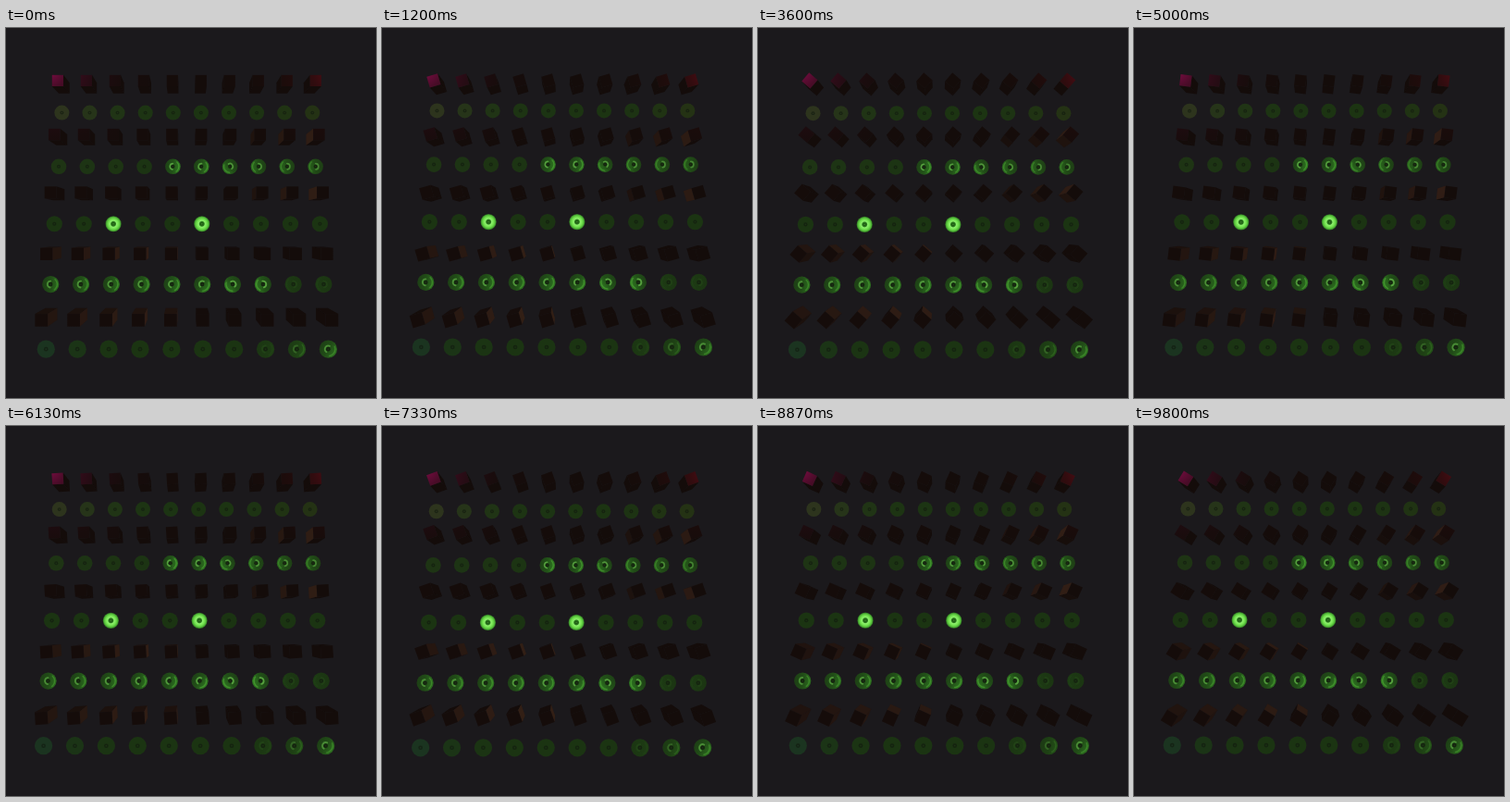
Recreate the animation shown at these times as an HTML page with a canvas. Size 400 by 400 pixels, loop 9870 ms.

```html
<!DOCTYPE html>
<html>
<head>
<meta charset="utf-8">
<title>Cubes and rings</title>
<style>
html, body { margin: 0; width: 100%; height: 100%; overflow: hidden; background: #1b191c; }
canvas { display: block; width: 400px; height: 400px; }
</style>
</head>
<body>
<canvas id="stage"></canvas>
<script>
const LOOP = 9870, STEPS = 0.015, TURN = -88.6 * Math.PI / 180;
const COLS = 10, VX = 195, VY = 218;
const DARK = [20, 12, 10];
const cubeRows = [
  { y: 61, gap: 30.2, size: 12.2, depth: 0.052 },
  { y: 118, gap: 30.9, size: 12.5, depth: 0.058 },
  { y: 179, gap: 31.7, size: 12.9, depth: 0.064 },
  { y: 243.5, gap: 32.6, size: 13.3, depth: 0.068 },
  { y: 312.5, gap: 33.7, size: 13.7, depth: 0.072 }
];
const ringRows = [
  { y: 90.8, gap: 30.1, r: 8 },
  { y: 149, gap: 30.85, r: 8.3 },
  { y: 211, gap: 31.9, r: 8.6 },
  { y: 276.3, gap: 32.8, r: 9.1 },
  { y: 346.4, gap: 33.9, r: 9.6 }
];
const pink = { x: 45, y: 45, c: [125, 0, 70] };
const red = { x: 352, y: 50, c: [70, 0, 12] };

const canvas = document.getElementById('stage');
const ctx = canvas.getContext('2d');
const dpr = window.devicePixelRatio || 1;
canvas.width = canvas.height = 400 * dpr;

const rgb = c => 'rgb(' + c.map(v => Math.max(0, Math.min(255, Math.round(v)))).join(',') + ')';
const mix = (a, b, k) => a.map((v, i) => v + (b[i] - v) * k);
const add = (a, b, k) => a.map((v, i) => v + b[i] * k);
const glow = (l, x, y) => Math.exp(-Math.hypot(x - l.x, y - l.y) / 32);
const colX = (mid, gap, col) => mid + (col - 4.5) * gap;

// Face colour fading away from a light
function fade(l) {
  const g = ctx.createRadialGradient(l.x, l.y, 0, l.x, l.y, 120);
  for (let d = 0; d <= 120; d += 10) g.addColorStop(d / 120, rgb(add(DARK, l.c, Math.exp(-d / 24))));
  return g;
}
const pinkFace = fade(pink), redFace = fade(red);

function poly(pts, color) {
  ctx.beginPath();
  pts.forEach(p => ctx.lineTo(p[0], p[1]));
  ctx.closePath();
  ctx.fillStyle = color;
  ctx.fill();
}

function disc(x, y, r, fill) {
  ctx.beginPath();
  ctx.arc(x, y, r, 0, 7);
  ctx.fillStyle = fill;
  ctx.fill();
}

function arc(x, y, r, mid, half, width, color) {
  ctx.beginPath();
  ctx.arc(x, y, r, mid - half, mid + half);
  ctx.lineCap = 'round';
  ctx.lineWidth = width;
  ctx.strokeStyle = color;
  ctx.stroke();
}

function square(x, y, half, turn) {
  const pts = [];
  for (let i = 0; i < 4; i++) {
    const a = turn + Math.PI / 4 + i * Math.PI / 2;
    pts.push([x + Math.cos(a) * half * Math.SQRT2, y + Math.sin(a) * half * Math.SQRT2]);
  }
  return pts;
}

// Warm light on the sides that face the middle of the grid
function warmth(row, col) {
  if (row > 2 && col < 5) return { k: 0.5 + 0.13 * Math.min(col, 3), x: 0.93, y: -0.35 };
  if ((row === 1 || row === 2) && col > 6) return { k: 0.35 + 0.25 * (col - 7), x: -0.95, y: -0.3 };
  return { k: 0, x: 0, y: 0 };
}

function cube(row, col, turn) {
  const g = cubeRows[row], x = colX(195.3, g.gap, col);
  const dx = (VX - x) * g.depth / 2, dy = (VY - g.y) * g.depth / 2;
  const front = square(x - dx, g.y - dy, g.size / 2, turn);
  const back = square(x + dx, g.y + dy, g.size / 2 * (1 - g.depth), turn);
  const warm = warmth(row, col);
  for (let i = 0; i < 4; i++) {
    const j = (i + 1) % 4, a = turn + Math.PI / 2 * (i + 1);
    const nx = Math.cos(a), ny = Math.sin(a);
    if (nx * dx + ny * dy <= g.size * g.depth / 4) continue;
    const lit = Math.max(0, nx * warm.x + ny * warm.y) * warm.k;
    poly([front[i], front[j], back[j], back[i]], rgb(add(DARK, [34, 21, 13], lit)));
  }
  poly(front, col < 5 ? pinkFace : redFace);
}

// Strength and position of the green light on each ring
function shine(row, col) {
  if (row === 1 && col > 3) return { k: 1 - 0.06 * (col - 4), x: 235, y: 153 };
  if (row === 3) return { k: col < 8 ? 0.8 + 0.03 * col : 0.1, x: 228, y: 288 };
  if (row === 4 && col > 6) return { k: [0.12, 0.4, 0.8][col - 7], x: 368, y: 358 };
  return { k: 0, x: 200, y: 200 };
}

function brightRing(x, y, r) {
  const f = ctx.createRadialGradient(x, y, 0, x, y, r);
  f.addColorStop(0, '#3f8f2c');
  f.addColorStop(0.14, '#1f5a15');
  f.addColorStop(0.28, '#2c7a1e');
  f.addColorStop(0.4, '#8df06c');
  f.addColorStop(0.65, '#70e04c');
  f.addColorStop(0.85, '#4fb437');
  f.addColorStop(1, '#2c6a20');
  disc(x, y, r, f);
}

function ring(row, col, ox, oy) {
  const g = ringRows[row], r = g.r;
  const bx = colX(194.5, g.gap, col), x = bx + ox, y = g.y + oy;
  if (row === 2 && (col === 2 || col === 5)) return brightRing(x, y, r);

  let base = add([27, 52, 18], [80, 0, 50], glow(pink, bx, g.y));
  base = add(base, [40, -10, 10], glow(red, bx, g.y));
  if (row === 4) base = add(base, [0, 0, 14], Math.exp(-col * 1.2));
  const s = shine(row, col);
  const a = Math.atan2(s.y - g.y, s.x - bx), ux = Math.cos(a), uy = Math.sin(a);
  const hole = mix(base, [18, 26, 15], 0.65);
  const f = ctx.createLinearGradient(x - ux * r, y - uy * r, x + ux * r, y + uy * r);
  f.addColorStop(0, rgb(mix(base, [30, 66, 22], s.k)));
  f.addColorStop(0.5, rgb(mix(base, [34, 82, 24], s.k)));
  f.addColorStop(1, rgb(mix(base, [48, 122, 34], s.k)));
  disc(x, y, r, f);
  if (s.k) {
    arc(x, y, r * 0.78, a, 0.9, r * 0.16, 'rgba(92,190,62,' + 0.45 * s.k + ')');
    arc(x, y, r * 0.38, a + Math.PI, 1.5, r * 0.2, 'rgba(120,214,88,' + 0.6 * s.k + ')');
  }
  disc(x, y, r * 0.24, rgb(hole));
  disc(x, y, r * 0.09, rgb(base));
}

function draw(ms) {
  const t = Math.floor((ms % LOOP + 4) * STEPS) / 15;
  const turn = TURN * t, orbit = turn + 0.55;
  const ox = Math.cos(orbit) * 1.55, oy = Math.sin(orbit) * 1.45;
  ctx.setTransform(dpr, 0, 0, dpr, 0, 0);
  ctx.fillStyle = '#1b191c';
  ctx.fillRect(0, 0, 400, 400);
  for (let row = 0; row < 5; row++) {
    for (let col = 0; col < COLS; col++) {
      cube(row, col, turn);
      ring(row, col, ox, oy);
    }
  }
}

const start = performance.now();
function tick() {
  draw(performance.now() - start);
  requestAnimationFrame(tick);
}
tick();
</script>
</body>
</html>
```
